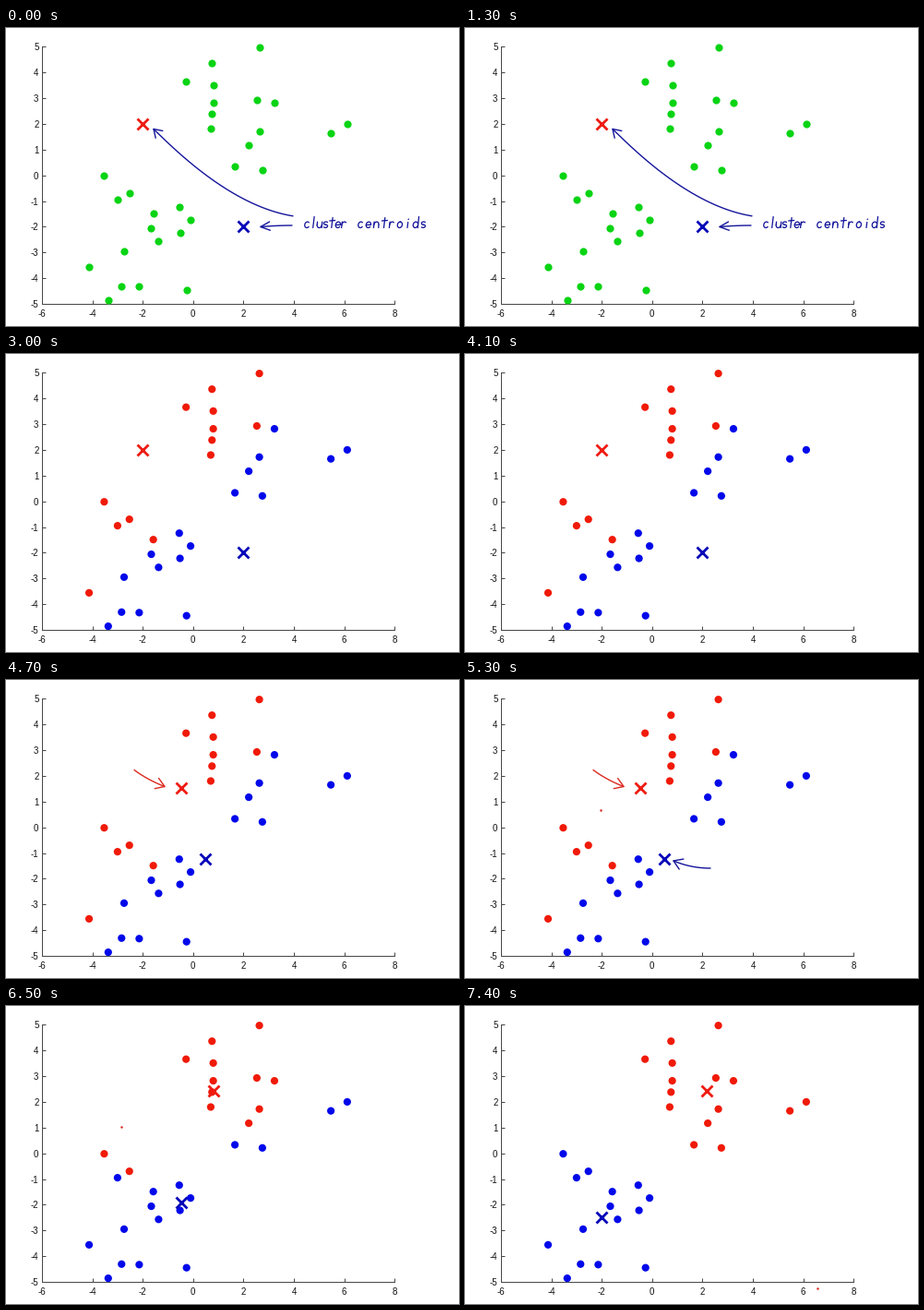
A matplotlib script for the animation above (8000 ms loop, 491 by 323 pixels).

```python
import numpy as np
import matplotlib.pyplot as plt
from matplotlib.animation import FuncAnimation

W, H, DPI = 491, 323, 100
PX = 72 / DPI          # points per pixel
STEP, LOOP = 100, 8000

GREEN, RED, BLUE = "#08d414", "#f01a08", "#0008ea"
CROSS_RED, CROSS_BLUE = "#ee1c12", "#0606b8"
INK, PEN_RED, AXIS = "#15159c", "#dc2a20", "#484848"

POINTS = np.array([
    (2.63, 4.97), (.75, 4.36), (-.28, 3.66), (.8, 3.51), (.8, 2.82), (.75, 2.38),
    (.7, 1.8), (2.53, 2.93), (3.23, 2.82), (2.63, 1.72), (2.21, 1.17), (6.12, 2),
    (5.47, 1.65), (1.66, .33), (2.75, .21), (-3.53, -.02), (-2.53, -.7), (-3, -.95),
    (-1.58, -1.49), (-4.13, -3.56), (-.55, -1.24), (-.1, -1.74), (-1.66, -2.06),
    (-.52, -2.22), (-1.37, -2.57), (-2.74, -2.95), (-2.84, -4.31), (-2.14, -4.33),
    (-.26, -4.45), (-3.37, -4.86)])
START = np.array([(-2, 2), (2, -2)])

# Times (ms) of alternating k-means steps: assign, move, assign, move, ...
CHANGES = [1600, 4400, 5700, 6500, 6700, 7000]
# (start ms, end ms, pixel position) of the resting pen tip
PEN = [(5300, 5500, (147, 141)), (6500, 6700, (125, 131)), (7400, 8000, (382.5, 305.5))]


def k_means(centroids, rounds):
    """Centroids and point labels after each round."""
    moves, labels = [centroids], []
    for _ in range(rounds):
        dist = np.linalg.norm(POINTS[:, None] - moves[-1], axis=2)
        labels.append(dist.argmin(axis=1))
        moves.append(np.array([POINTS[labels[-1] == k].mean(axis=0) for k in (0, 1)]))
    return moves, labels


def bezier(*pts, n=40):
    """Bezier curve of any degree (de Casteljau)."""
    t = np.linspace(0, 1, n)[:, None]
    p = [np.array(q, float) + 0 * t for q in pts]
    while len(p) > 1:
        p = [a + (b - a) * t for a, b in zip(p, p[1:])]
    return p[0]


def arc(a, b, cy=3.2, rx=2.6, ry=3.2):
    t = np.radians(np.linspace(a, b, 20))
    return np.column_stack([rx * np.cos(t), cy + ry * np.sin(t)])


def line(*pts):
    return np.array(pts, float)


# Handwritten letters, centred on their slot, y up from the baseline.
left, right = line((-2.6, 6.4), (-2.6, 0)), line((2.6, 6.4), (2.8, 0))
GLYPHS = {
    "c": [arc(50, 320)],
    "d": [arc(20, 340), line((2.6, 12), (2.8, 0))],
    "e": [arc(0, 320), line((-2.5, 3), (2.6, 3.2))],
    "i": [line((0, 6), (0, 0)), line((0, 9), (.4, 9.4))],
    "l": [line((0, 12), (0, 0))],
    "n": [left, arc(180, 0), line((2.6, 3.2), (2.8, 0))],
    "o": [arc(90, 450)],
    "r": [left, arc(180, 50)],
    "s": [arc(40, 270, 4.9, 2.2, 1.6), arc(90, -140, 1.7, 2.2, 1.6)],
    "t": [line((0, 11), (0, 0)), line((-3, 7.5), (3, 8))],
    "u": [line((-2.6, 6.4), (-2.6, 3.2)), arc(180, 360), right],
}


def stroke(pts, color, width=1.4):
    return ink.plot(*pts.T, color=color, lw=width * PX, solid_capstyle="round",
                    solid_joinstyle="round")[0]


def arrow(color, *pts, barb=11, spread=33):
    """Curved shaft with an open head at its last point."""
    tip, back = np.array(pts[-1]), np.subtract(pts[-2], pts[-1])
    heading = np.arctan2(back[1], back[0])
    ends = [tip + barb * np.array([np.cos(a), np.sin(a)])
            for a in heading + np.radians([-spread, spread])]
    return [stroke(bezier(*pts), color), stroke(line(ends[0], tip, ends[1]), color)]


def write(word, x, pitch, baseline=216.5, slant=.12):
    out = []
    for i, ch in enumerate(word):
        for g in GLYPHS[ch]:
            u, v = g.T
            pts = np.column_stack([x + i * pitch + u + slant * v, baseline - v])
            out.append(stroke(pts, INK, 1.3))
    return out


plt.rcParams.update({"font.family": "Liberation Sans", "axes.unicode_minus": False})
fig = plt.figure(figsize=(W / DPI, H / DPI), dpi=DPI, facecolor="white")

# chart in data units
ax = fig.add_axes([39 / W, 24 / H, 382.2 / W, 278.7 / H])
ax.set(xlim=(-6, 8), ylim=(-5, 5), xticks=range(-6, 9, 2), yticks=range(-5, 6))
ax.spines[["top", "right"]].set_visible(False)
ax.spines[["left", "bottom"]].set(color=AXIS, linewidth=PX)
ax.tick_params(direction="in", length=4 * PX, width=PX, color=AXIS,
               labelsize=9.8 * PX, labelcolor="#101010")
ax.tick_params(axis="x", pad=6 * PX)
ax.tick_params(axis="y", pad=3.5 * PX)
dots = ax.scatter(*POINTS.T, s=(8.2 * PX) ** 2, linewidths=0, zorder=3, clip_on=False)
crosses = [ax.plot([0], [0], "x", ms=12 * PX, mew=2.8 * PX, color=c, zorder=4)[0]
           for c in (CROSS_RED, CROSS_BLUE)]

# pen layer in pixels
ink = fig.add_axes([0, 0, 1, 1])
ink.axis("off")
ink.set(xlim=(0, W), ylim=(H, 0))
pen = ink.plot([0], [0], "o", ms=2.5 * PX, mew=0, color=PEN_RED)[0]
note = (write("cluster", 326, 6.7) + write("centroids", 384, 8.5)
        + arrow(INK, (311, 203.8), (244, 193), (183, 132), (160, 109.5), barb=10)
        + arrow(INK, (310, 214), (293, 214), (276, 215.5), spread=25))
red_arrow = arrow(PEN_RED, (139, 97.5), (153, 108), (172, 115.5))
blue_arrow = arrow(INK, (266, 204), (245, 204), (226, 196))
# (start ms, end ms, artists)
INKED = [(0, 1600, note), (4700, 5700, red_arrow), (5000, 5700, blue_arrow)]

MOVES, LABELS = k_means(START, 3)


def update(i):
    t = i * STEP
    done = sum(t >= c for c in CHANGES)
    assigned, moved = (done + 1) // 2, done // 2

    dots.set_facecolors(np.array([RED, BLUE])[LABELS[assigned - 1]] if assigned else GREEN)
    for cross, (x, y) in zip(crosses, MOVES[moved]):
        cross.set_data([x], [y])
    for start, end, artists in INKED:
        for a in artists:
            a.set_visible(start <= t < end)
    pen.set_visible(False)
    for start, end, (x, y) in PEN:
        if start <= t < end:
            pen.set_data([x], [y])
            pen.set_visible(True)
    return []


anim = FuncAnimation(fig, update, frames=LOOP // STEP, interval=STEP,
                     repeat=True, repeat_delay=0, init_func=lambda: update(0))
plt.show()
```
